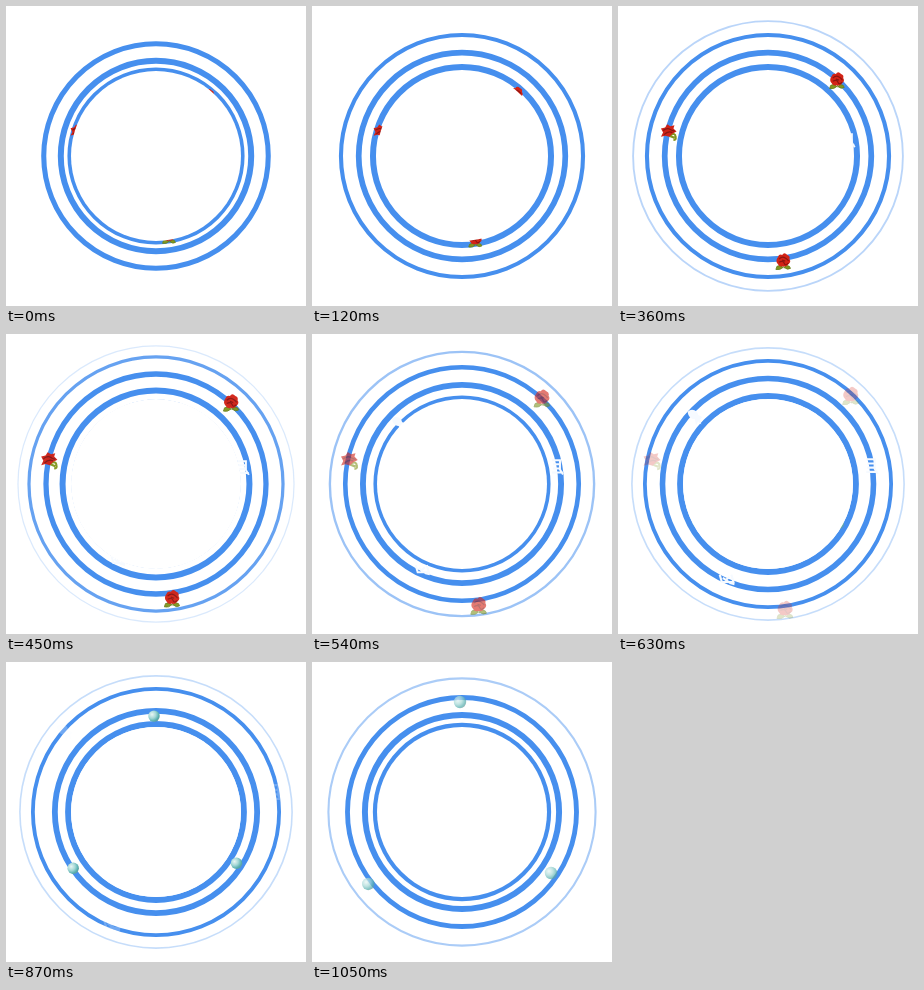
An HTML page that plays this animation: 300x300 px, repeating every 1.08 s.

```html
<!DOCTYPE html>
<html lang="en">
<head>
<meta charset="utf-8">
<title>Ripple rings</title>
<style>
  html, body { margin: 0; width: 100%; height: 100%; overflow: hidden; background: #fff; }
  svg { display: block; width: 100vw; height: 100vh; }
</style>
</head>
<body>
<svg viewBox="0 0 300 300">
  <defs>
    <radialGradient id="pearl" cx=".33" cy=".35" r=".75">
      <stop offset="0" stop-color="#e9f6f4"/>
      <stop offset=".45" stop-color="#a5d8d6"/>
      <stop offset=".8" stop-color="#55aeae"/>
      <stop offset="1" stop-color="#6f9796"/>
    </radialGradient>
    <g id="rose">
      <path d="M0 3 1 7M-6 5Q-3 3 0 6Q-3 9-7 8ZM1 6Q3 3 6 5L7 7Q4 9 1 6Z" fill="#83961f" stroke="#66801c" stroke-width=".8"/>
      <path d="M-5-4Q-4-7-1-6Q1-9 4-6Q7-5 6-2Q8 1 5 3Q3 6 0 5Q-4 6-5 3Q-8 0-5-4Z" fill="#d32316"/>
      <path d="M-4-2Q-1-5 2-3T5 0M-4 1Q0-1 1 2T5 2M-1-1 2 0" fill="none" stroke="#8d1510" stroke-width="1.1"/>
    </g>
    <g id="sideRose">
      <path d="M2 3Q7 1 7 5Q8 8 5 8M1 4 6 6" fill="none" stroke="#83961f" stroke-width="2"/>
      <path d="M-7-3-3-4-1-7 2-5 6-6 5-3 8 0 4 2 1 5-3 4-7 5-5 1Z" fill="#cf2217"/>
      <path d="M-5-1Q-1-4 2-2T6-1M-4 3Q0-1 4 1" fill="none" stroke="#861713" stroke-width="1.2"/>
    </g>
    <g id="comb" fill="none" stroke="#f6faff" stroke-width="2">
      <path d="M-5-6H4M-4-2H4M-4 2H4M3-7V3L6 8M-5 6H6"/>
    </g>
    <g id="hook" fill="none" stroke="#f6faff" stroke-width="2">
      <path d="M-7-4-5 3H6L4-4M-4-1 3 4 7 5M-1 1 2-2"/>
    </g>
    <g id="leaf" fill="#f6faff">
      <path d="M-6-5Q-2-9 3-5L4-2 8 0 6 2 7 7 4 4 2 8 1 2Q-5 2-6-5Z"/>
    </g>
    <circle id="ball" r="5.6" fill="url(#pearl)"/>
  </defs>
  <g id="rings" fill="none" stroke="#468fee"></g>
  <g id="charms"></g>
  <circle cx="150" cy="150" r="85" fill="#fff"/>
</svg>
<script>
const LOOP = 1080, STEP = 30, RING_LIFE = 975, CHARM_TRAVEL = 680;
const ringStarts = [-480, -240, 0, 240, 540, 780, 1020];

// shape, start time, path from (x, y) to (x, y)
const charmSpecs = [
  ['rose', 0, 202, 90, 233, 61],
  ['rose', 0, 163, 230, 167, 276],
  ['sideRose', 0, 71, 125, 33, 126],
  ['comb', 240, 228, 134, 269.5, 130],
  ['hook', 240, 114, 216, 106, 263],
  ['leaf', 240, 106, 104, 57, 70],
  ['ball', 540, 148, 72, 148, 34.5],
  ['ball', 540, 81, 186.5, 52, 228],
  ['ball', 540, 219.7, 188.8, 242.3, 214.8]
];

const clamp = v => Math.max(0, Math.min(1, v));
const mix = (a, b, p) => a + (b - a) * p;

function add(parent, tag, attrs) {
  const el = document.createElementNS('http://www.w3.org/2000/svg', tag);
  set(el, attrs);
  return document.getElementById(parent).appendChild(el);
}

function set(el, attrs) {
  for (const key in attrs) el.setAttribute(key, attrs[key]);
}

const rings = ringStarts.map(start => ({ start, el: add('rings', 'circle', { cx: 150, cy: 150 }) }));
const charms = charmSpecs.map(([shape, start, ...path]) =>
  ({ start, path, el: add('charms', 'use', { href: '#' + shape }) }));

// Slow emergence, fastest at mid-life, gentle stop.
function ringRadius(age) {
  if (age < 0) return Math.max(0, 85.6 + 0.045 * age);
  const reach = age < 450 ? 25 : 30;
  return 110 + reach * Math.sin(0.0754 / reach * (age - 450));
}

function drawRing({ start, el }, time) {
  const age = time - start;
  const r = ringRadius(age);
  const width = 6 * (1 - (Math.max(0, r - 92) / 51.6) ** 2);
  const opacity = age > RING_LIFE ? 0 : clamp(0.17 + 0.057 * (138.5 - r));
  set(el, { r, 'stroke-width': width, opacity });
}

function drawCharm({ start, path: [x0, y0, x1, y1], el }, time) {
  const age = time - start;
  const p = 0.5 - 0.5 * Math.cos(Math.PI * clamp(age / CHARM_TRAVEL));
  const scale = mix(0.92, 1.14, p);
  set(el, {
    transform: `translate(${mix(x0, x1, p)} ${mix(y0, y1, p)}) scale(${scale})`,
    opacity: age < 0 ? 0 : clamp(1 - (age - 440) / 250)
  });
}

function render(time) {
  rings.forEach(ring => drawRing(ring, time));
  charms.forEach(charm => drawCharm(charm, time));
}

const origin = performance.now();
function tick() {
  const elapsed = (performance.now() - origin) % LOOP;
  render(Math.floor(elapsed / STEP) * STEP);
  requestAnimationFrame(tick);
}
render(0);
requestAnimationFrame(tick);
</script>
</body>
</html>
```
